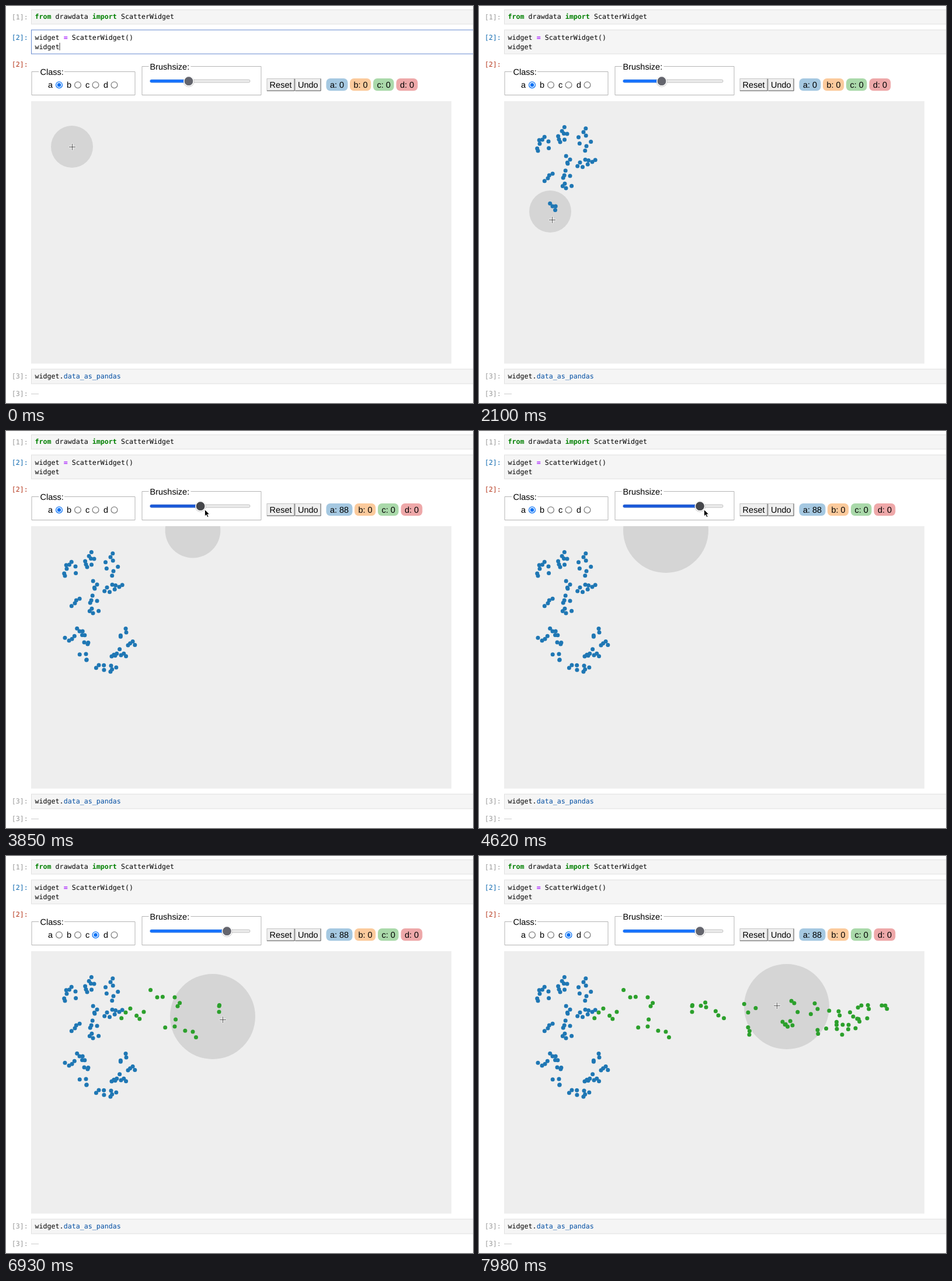
These frames come from a looping animation (800x680 px, 8 s). An HTML page:

```html
<!DOCTYPE html>
<html lang="en">
<head>
<meta charset="utf-8">
<title>Scatter widget</title>
<style>
html, body { margin: 0; width: 100%; height: 100%; overflow: hidden; background: #fff; }
svg { display: block; }
text { font: 14.5px "Liberation Sans", Arial, sans-serif; fill: #000; white-space: pre; text-rendering: geometricPrecision; }
.code text { font: 11.66px "DejaVu Sans Mono", monospace; }
.code .kw { fill: #008000; font-weight: bold; }
.code .op { fill: #a2f; font-weight: bold; }
.code .prop { fill: #0550a4; }
.code .old { fill: #9a9a9a; }
.cell { fill: #f5f5f5; stroke: #e0e0e0; }
.line { fill: none; stroke: #b4b4b4; }
.button { fill: #efefef; stroke: #c4c4c4; }
.edge { fill: none; stroke: #666; }
</style>
</head>
<body>
<svg id="stage" width="800" height="680" viewBox="0 0 800 680">
  <defs><clipPath id="board"><rect x="43" y="163" width="720" height="449.5"/></clipPath></defs>
  <g class="code">
    <rect class="cell" x="43.5" y="6.5" width="770" height="24.5"/>
    <rect class="cell" id="active" x="43.5" y="41" width="770" height="41"/>
    <rect class="cell" x="43.5" y="622" width="770" height="25"/>
    <text class="old" x="9.8" y="22.5">[1]:</text>
    <text x="9.8" y="57.5" style="fill:#0f69b0">[2]:</text>
    <text x="9.8" y="103.5" style="fill:#b5371c">[2]:</text>
    <text class="old" x="9.8" y="638">[3]:</text>
    <text class="old" x="9.8" y="668">[3]:</text>
    <text x="49.5" y="22.3"><tspan class="kw">from</tspan> drawdata <tspan class="kw">import</tspan> ScatterWidget</text>
    <text x="49.5" y="57.5">widget <tspan class="op">=</tspan> ScatterWidget()</text>
    <text x="49.5" y="73.5">widget</text>
    <text x="49.5" y="638">widget.<tspan class="prop">data_as_pandas</tspan></text>
    <rect id="caret" x="91.5" y="63" width="1" height="13" fill="#444"/>
    <path d="M43 664.5h13" stroke="#ccc"/>
  </g>
  <path class="line" d="M56 112.5H44V152.5H221V112.5H100"/>
  <path class="line" d="M244.5 103.5H233V152.5H437V103.5H316.5"/>
  <text x="58.5" y="118">Class:</text>
  <text x="246.5" y="109">Brushsize:</text>
  <g id="radios"></g>
  <rect x="247" y="126.2" width="171" height="4.8" rx="2.4" fill="#ececec" stroke="#b3b3b3" stroke-width=".8"/>
  <rect id="fill" x="246.6" y="126" width="66" height="5.2" rx="2.6"/>
  <circle id="shade" cy="129.3" r="9.6" fill="#000" opacity=".18"/>
  <circle id="thumb" cy="128.7" r="8.2" stroke="#fff" stroke-width="1.6"/>
  <rect class="button" x="447" y="124.5" width="47" height="20.5"/>
  <path class="edge" d="M447 145.2H494.2V124.5"/>
  <rect class="button" x="495.5" y="124.5" width="43.5" height="20.5"/>
  <path class="edge" d="M495.5 145.2H539.2V124.5"/>
  <text x="451.6" y="139.6">Reset</text>
  <text x="500" y="139.6">Undo</text>
  <g id="chips"></g>
  <rect x="43" y="163" width="720" height="449.5" fill="#eee"/>
  <g clip-path="url(#board)"><circle id="brush" fill="#d5d5d5"/></g>
  <g id="dots"></g>
  <g id="cross" fill="none">
    <path d="M-6 0H6M0 -6V6" stroke="#fff" stroke-width="3" opacity=".75"/>
    <path d="M-5.5 0H5.5M0 -5.5V5.5" stroke="#555"/>
  </g>
  <path id="arrow" d="M0 0V11.6L2.7 9.1L4.5 13.2L6.5 12.3L4.7 8.3H8.3Z" fill="#000" stroke="#fff" stroke-width=".9"/>
</svg>
<script>
const LOOP = 8000, STEP = 70, TOP = 163;
const $ = id => document.getElementById(id);

function add(parent, tag, attrs, text) {
  const el = document.createElementNS('http://www.w3.org/2000/svg', tag);
  set(el, attrs);
  if (text) el.textContent = text;
  return parent.appendChild(el);
}
function set(el, attrs) {
  for (const k in attrs) el.setAttribute(k, attrs[k]);
}
const show = (el, on) => set(el, { visibility: on ? 'visible' : 'hidden' });

// Pointer path: time, x, y
const path = [
  [0, 113, 241], [490, 119, 240], [1050, 119, 240], [1260, 152, 223], [1470, 178, 238],
  [1750, 158, 276], [2030, 122, 352], [2100, 125, 366], [2380, 150, 388], [2660, 190, 388],
  [3010, 215, 339], [3080, 264, 266], [3150, 320, 170], [3290, 318, 134], [3570, 320, 134],
  [4480, 385, 134], [4830, 385, 134], [5460, 155, 136], [5740, 155, 136], [6160, 227, 262],
  [6300, 230, 265], [6860, 354, 275], [6930, 371, 280], [7490, 655, 276], [7690, 670, 276],
  [7910, 527, 258], [7980, 510, 256]
];
function pointer(t) {
  const i = path.findIndex(p => p[0] > t);
  if (i < 0) return path[path.length - 1].slice(1);
  const [t0, x0, y0] = path[i - 1], [t1, x1, y1] = path[i];
  const f = (t - t0) / (t1 - t0);
  return [x0 + (x1 - x0) * f, y0 + (y1 - y0) * f];
}

let seed = 7;
function random() {
  seed = seed * 16807 % 2147483647;
  return seed / 2147483647;
}

// Each anchor is a dot with a few seeded neighbours, in drawing order.
const blue = [
  [104, 236], [119, 232], [139, 233], [151, 219], [179, 216], [184, 240], [194, 267], [173, 268],
  [156, 263], [156, 291], [149, 312], [118, 295], [126, 343], [108, 359], [134, 362], [137, 382],
  [159, 401], [181, 386], [180, 402], [197, 384], [209, 367], [206, 345]
];
const green = [
  [205, 268], [236, 267], [259, 242], [289, 242], [289, 292], [320, 301], [365, 267], [389, 259],
  [410, 273], [461, 268], [463, 306], [520, 284], [540, 252], [537, 290], [580, 262], [580, 298],
  [616, 266], [641, 275], [655, 256], [690, 256], [665, 278], [645, 295], [623, 289], [622, 306]
];
const dots = [];
function scatter(anchors, fill, size, spread, when) {
  anchors.forEach(([x, y], a) => {
    for (let j = 0; j < size; j++) {
      const r = j && spread * (.35 + .65 * random()), turn = 2 * Math.PI * random();
      const el = add($('dots'), 'circle', { cx: x + r * Math.cos(turn), cy: y + r * Math.sin(turn), r: 3.5, fill });
      dots.push({ el, t: when(a * size + j) });
    }
  });
}
scatter(blue, '#1f77b4', 4, 13, i => i < 52 ? 1070 + i * 20 : 2110 + (i - 52) * 24);
scatter(green, '#2ca02c', 3, 17, i => i < 21 ? 6300 + i * 30 : 6938 + (i - 21) * 15);

const radios = [['a', 72, 91], ['b', 104, 123], ['c', 136, 153.5], ['d', 167, 185.5]].map(([name, x, cx]) => {
  add($('radios'), 'text', { x, y: 139.6 }, name);
  const ring = add($('radios'), 'circle', { cx, cy: 135.2, r: 5.4, fill: '#fff', 'stroke-width': 1.3 });
  const core = add($('radios'), 'circle', { cx, cy: 135.2, r: 3.2, fill: '#0b72f5' });
  return { name, ring, core };
});

const chips = [
  ['a', 548.5, 37, '#a5c8e1'], ['b', 589, 36.2, '#fbca9c'],
  ['c', 629, 35.5, '#aad9aa'], ['d', 668.5, 36.8, '#eea8a9']
].map(([name, x, width, fill]) => {
  const g = add($('chips'), 'g', {});
  const box = add(g, 'rect', { x, y: 124, width, height: 21.3, rx: 7, fill });
  const label = add(g, 'text', { x: x + 6.4, y: 139.6 }, name + ': 0');
  return { g, box, label, width };
});

function draw(time) {
  const step = Math.floor(time / STEP), t = step * STEP;
  const [x, y] = pointer(t);

  // The brush trails one step behind and waits while the pointer is off the board.
  let k = Math.max(step - 1, 0);
  while (k > 0 && pointer(k * STEP)[1] < TOP) k--;
  const [cx, cy] = pointer(k * STEP);
  const drag = Math.min(Math.max((t - 3570) / 910, 0), 1);
  set($('brush'), { cx, cy, r: 36 + 37 * drag });

  const pressed = t >= 3570 && t < 4760, knob = 313 + 65.5 * drag;
  set($('fill'), { width: knob - 247, fill: pressed ? '#1d5bd8' : '#1873fb' });
  set($('thumb'), { cx: knob, fill: pressed ? '#46474b' : '#64656d' });
  set($('shade'), { cx: knob });

  const onBoard = y >= TOP;
  show($('cross'), onBoard);
  show($('arrow'), !onBoard);
  set($(onBoard ? 'cross' : 'arrow'), { transform: `translate(${x + .5} ${y + .5})` });

  const editing = t < 1050;
  set($('active'), { style: editing ? 'fill:#fff;stroke:#6689cf' : '' });
  show($('caret'), t < 490);

  const chosen = t < 5600 ? 'a' : 'c';
  radios.forEach(r => {
    const on = r.name === chosen;
    set(r.ring, { stroke: on ? '#0b72f5' : '#808080' });
    show(r.core, on);
  });

  const counted = t >= 3010;
  chips.forEach((c, i) => set(c.g, { transform: `translate(${counted && i ? 8 : 0} 0)` }));
  set(chips[0].box, { width: chips[0].width + (counted ? 8 : 0) });
  chips[0].label.textContent = counted ? 'a: 88' : 'a: 0';

  dots.forEach(d => show(d.el, t >= d.t));
}

const start = performance.now();
function tick() {
  draw((performance.now() - start) % LOOP);
  requestAnimationFrame(tick);
}
draw(0);
requestAnimationFrame(tick);
</script>
</body>
</html>
```
